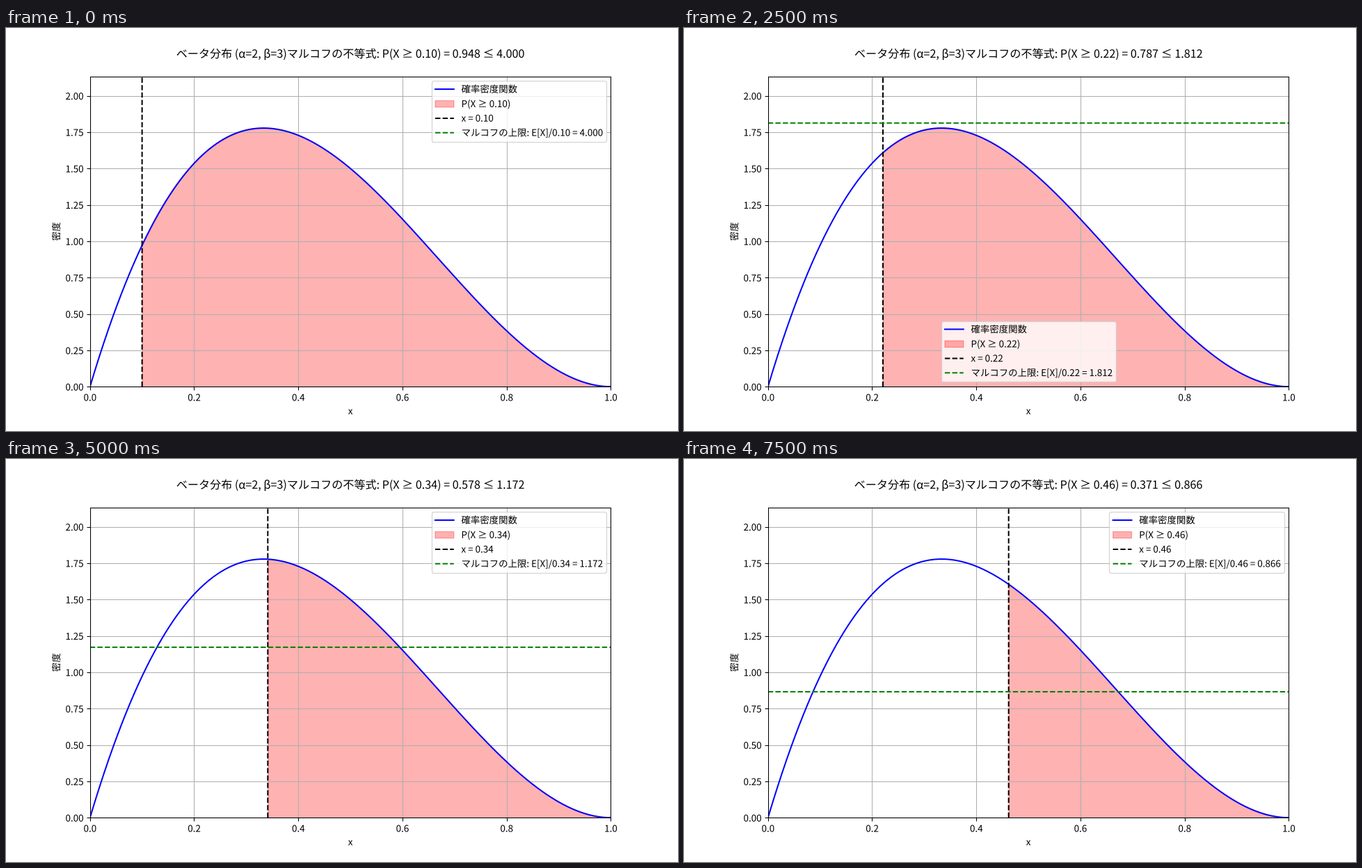
Animation, 966 px wide and 580 px high, one loop 8 s. Source, as a matplotlib script:

```python
import numpy as np
import matplotlib.pyplot as plt
from matplotlib.animation import FuncAnimation
from matplotlib.patheffects import Normal

plt.rcParams["font.family"] = "Noto Sans CJK JP"
# Outlined glyphs keep their sub-pixel positions.
plt.rcParams["path.effects"] = [Normal()]

DPI = 96.6
FRAMES, INTERVAL = 16, 500
ALPHA, BETA = 2, 3
MEAN = ALPHA / (ALPHA + BETA)
THRESHOLDS = np.linspace(0.1, 0.8, 30)


def pdf(x):
    return 12 * x * (1 - x) ** 2


def tail(t):
    return 1 - (6 * t**2 - 8 * t**3 + 3 * t**4)


xs = np.linspace(0, 1, 1000)
ys = pdf(xs)
y_top = ys.max() * 1.2

fig, ax = plt.subplots(figsize=(966.001 / DPI, 580.001 / DPI), dpi=DPI)


def draw(i):
    t = THRESHOLDS[i]
    bound = MEAN / t
    ax.clear()

    ax.plot(xs, ys, "b-", label="確率密度関数")
    region = np.linspace(t, 1, 800)
    ax.fill_between(region, pdf(region), color="red", alpha=0.3,
                    label=f"P(X ≥ {t:.2f})")
    ax.axvline(t, color="black", linestyle="--", snap=False,
               label=f"x = {t:.2f}")
    ax.axhline(bound, color="green", linestyle="--", snap=False,
               label=f"マルコフの上限: E[X]/{t:.2f} = {bound:.3f}")

    ax.set_xlim(0, 1)
    ax.set_ylim(0, y_top)
    ax.set_xlabel("x")
    ax.set_ylabel("密度")
    ax.set_title(f"ベータ分布 (α={ALPHA}, β={BETA})マルコフの不等式: "
                 f"P(X ≥ {t:.2f}) = {tail(t):.3f} ≤ {bound:.3f}", pad=20)
    ax.grid(True)

    # The legend steps aside while the bound crosses the upper corner.
    crossing = 1.69 < bound < y_top
    legend = ax.legend(loc="lower center" if crossing else "upper right")
    for handle in legend.get_lines() + legend.get_patches():
        handle.set_snap(False)
    return []


anim = FuncAnimation(fig, draw, frames=FRAMES, init_func=lambda: [],
                     interval=INTERVAL, repeat=True, repeat_delay=0)
plt.show()
```
